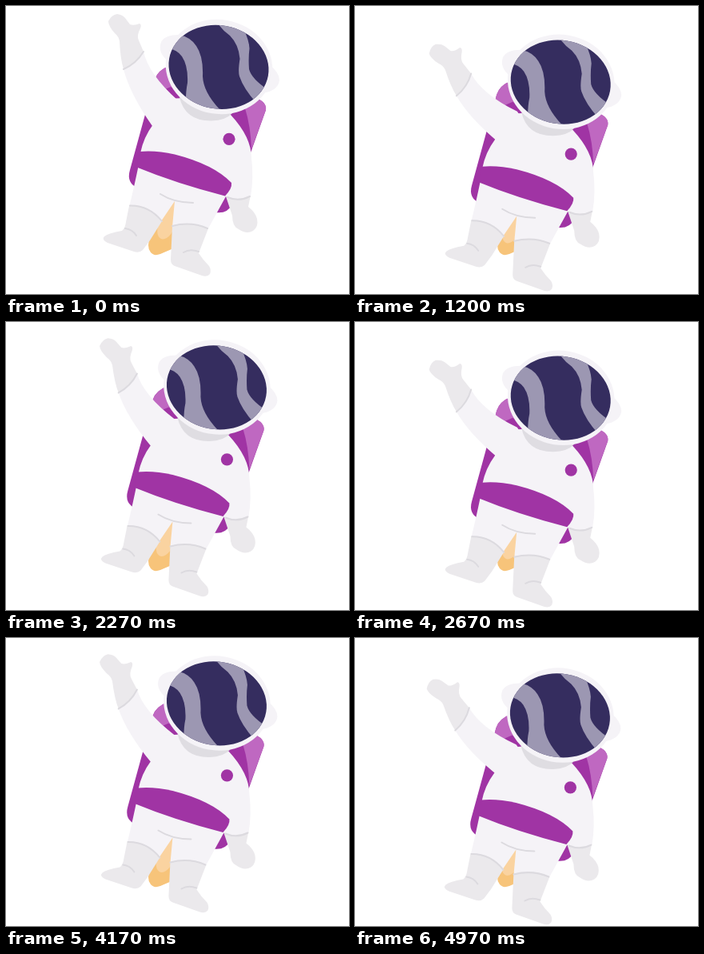
Animation, 429 px wide and 360 px high, one loop 5.07 s. Source, as an HTML page:

```html
<!DOCTYPE html>
<html lang="en">
<head>
<meta charset="utf-8">
<title>Waving astronaut</title>
<style>
  html, body { margin: 0; width: 100%; height: 100%; overflow: hidden; background: #fff; }
  svg { display: block; width: 100vw; height: 100vh; }
  .suit { fill: #f5f3f7; }
  .grey { fill: #ebe9ec; }
  .plum { fill: #a034a4; }
  .pink { fill: #bf68c1; }
  .glass { fill: #352d5f; }
  .shine { fill: #9c97b2; }
  .fold { fill: none; stroke: #dcdadf; stroke-width: 2; stroke-linecap: round; }
</style>
</head>
<body>
<svg viewBox="0 0 429 360">
  <defs>
    <clipPath id="visor"><ellipse cx="266" cy="76.4" rx="62.8" ry="52.2" transform="rotate(10 266 76.4)"/></clipPath>
  </defs>

  <path fill="#f7c47a" d="M210 235 L181 287 Q175 301 181 308 Q185 313 193 310 L207 304 L214 298 L222 240Z"/>
  <path id="core" fill="#fad3a0" d="M206 236 L190 274 Q187 290 196 291.500 Q207 291 214 268 L222 236Z"/>

  <g id="body">
    <!-- backpack -->
    <path class="plum" d="M204 75 Q190 80 186 92 L155 205 Q150 222 166 228 L262 258 Q277 260 283 248 L325 130 Q327 118 303 112Z"/>
    <path class="pink" d="M204 75 Q190 80 186 92 L181 112 L206 101 L222 112 L230 80Z"/>
    <path class="pink" d="M299 120 L303 112 Q327 117 325 130 L307 179 Q306 150 299 128Z"/>

    <!-- raised arm -->
    <g id="arm">
      <path class="suit" d="M147 79 Q155 110 183 150 L225 148 L215 118 Q178 85 172 57Z"/>
      <path class="grey" d="M147 79 Q143 66 142 44 Q141 38 136 34 Q128 25 128 19 Q132 11 139 10 Q146 11 149 15 L155 23 Q160 25 167 22 Q170 23 168 28 Q163 37 166 43 L172 57 Q163 72 147 79Z"/>
      <path class="fold" d="M147 79 Q163 72 172 57"/>
    </g>

    <!-- lowered hand -->
    <path class="grey" d="M274 235 L283 262 Q283 276 291 279 Q301 286 309 281 Q316 276 314 266 Q312 258 303 251 L306 236Z"/>

    <!-- torso and legs -->
    <path class="suit" d="M168 184 Q172 164 184 148 L198 116 L225 115 L281 136 Q307 164 307 190 Q310 215 306 238 Q290 245 275 238 L253 278 L208 276 L211 244 L194 269 L154 251 Q158 236 165 203Z"/>
    <path class="fold" d="M277 239 Q291 245 305 238"/>
    <path class="fold" d="M193 235 Q210 246 234 246"/>

    <!-- boots -->
    <path class="grey" d="M154 250 Q179 249 195 269 L180 293 L171 305 Q167 309 160 307 L127 296 Q119 292 123 288 Q128 284 145 281 Q149 278 150 270Z"/>
    <path class="fold" d="M155 249.500 Q179 249 195 269 M149 278 Q158 279 163 287"/>
    <path class="grey" d="M208 275 Q231 269 253 278 L241 309 Q246 317 254 325 Q257 330 255 335 Q252 339 245 337 L211 325 Q206 323 206 317Z"/>
    <path class="fold" d="M208 275 Q231 269 252 278 M222 308 Q230 303 241 307"/>

    <path class="plum" d="M167 182 Q187 180 211 185.500 Q260 198 282 221 Q283 228 274 237.500 Q212 221.500 163.500 201.500Z"/>
    <circle class="plum" cx="279" cy="166.300" r="7.600"/>

    <!-- helmet -->
    <path fill="#dfdde2" d="M217 114 Q224 144 257 143.500 Q275 143 283 134Z"/>
    <path class="suit" d="M216 36 Q199 36 194 45 Q189 58 203 69Z M329 73 Q342 83 342 93 Q340 106 321 109Z"/>
    <ellipse class="suit" cx="266.500" cy="76" rx="67" ry="59" transform="rotate(10 266.500 76)"/>
    <g clip-path="url(#visor)">
      <rect class="glass" x="195" y="15" width="142" height="122"/>
      <path class="shine" d="M200 53 Q213 53 220 63 Q228 75 227 96 Q224.500 108 225 124 L272 134 Q247 110 246 88 Q247 63 238 50 Q231 39 217 36 L200 40Z"/>
      <path class="shine" d="M262 18 Q270 30 280 37 Q291 48 292.500 66 Q290 82 292 88 Q297 103 313 121 L328 105 Q307 91 304 79 Q303 65 304.500 53 Q304 43 297 28Z"/>
    </g>
  </g>
</svg>
<script>
  const LOOP = 5070, CYCLE = 24, LAST = 62;
  const el = id => document.getElementById(id);
  const body = el("body"), arm = el("arm"), core = el("core");

  // 12.5 poses per second, held on a 30 Hz clock
  function poseAt(ms) {
    const tick = Math.floor((ms + 4) * 0.03);
    return Math.min(LAST, Math.floor(tick / 2.4 + 1e-6));
  }

  function draw(ms) {
    const k = (1 - Math.cos(2 * Math.PI * poseAt(ms) / CYCLE)) / 2;
    body.setAttribute("transform", `translate(${-10.3 * k} ${22 * k})`);
    arm.setAttribute("transform", `rotate(${-18 * k} 195 128)`);
    core.setAttribute("transform", `translate(${-6 * k} ${6 * k})`);
  }

  const start = performance.now();
  function run() {
    draw((performance.now() - start) % LOOP);
    requestAnimationFrame(run);
  }
  draw(0);
  requestAnimationFrame(run);
</script>
</body>
</html>
```
